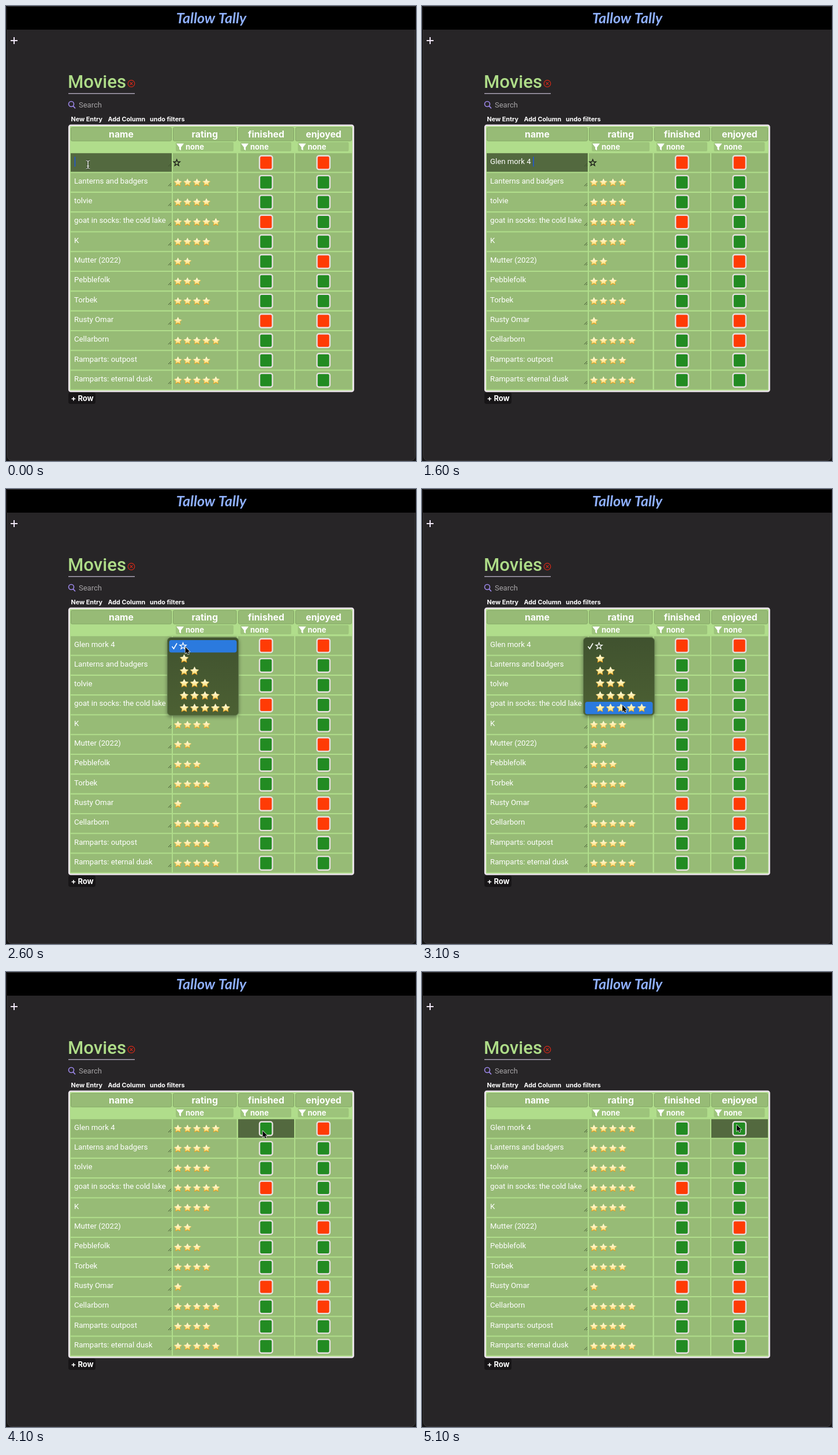
An HTML page with a canvas for the animation above (5.6 s loop, 710 px wide and 789 px high).

```html
<!DOCTYPE html>
<html lang="en">
<head>
<meta charset="utf-8">
<title>Movie list</title>
<style>
html, body { margin: 0; width: 100%; height: 100%; overflow: hidden; background: #151415; }
canvas { display: block; }
</style>
</head>
<body>
<canvas id="stage" width="710" height="789"></canvas>
<script>
const ctx = document.getElementById('stage').getContext('2d');
const LOOP = 5600;
const ROW_STEP = 34.3;
const BODY = 'Roboto, sans-serif';
const BOLD = 'Inter, sans-serif';
const CELL = '#97bb76', ACTIVE_ROW = '#93b772', FOCUS = '#53693f', LIGHT = '#b0dd8b';
const TYPED = 'Glen mork 4';

const COLUMNS = [
  { label: 'name', x: 112, w: 175 },
  { label: 'rating', x: 289, w: 110.5, filter: 294, fw: 100 },
  { label: 'finished', x: 402, w: 97, filter: 406, fw: 88 },
  { label: 'enjoyed', x: 501, w: 98, filter: 505.5, fw: 88 }
];

// title, stars, finished, enjoyed
const MOVIES = [
  ['Lanterns and badgers', 4, true, true],
  ['tolvie', 4, true, true],
  ['goat in socks: the cold lake', 5, false, true],
  ['K', 4, true, true],
  ['Mutter (2022)', 2, true, false],
  ['Pebblefolk', 3, true, true],
  ['Torbek', 4, true, true],
  ['Rusty Omar', 1, false, false],
  ['Cellarborn', 5, true, false],
  ['Ramparts: outpost', 4, true, true],
  ['Ramparts: eternal dusk', 5, true, true]
];

// Each step holds until the next one starts.
const STEPS = [
  { at: 0, chars: 0, focus: 0, caret: 1, beam: [142, 275] },
  { at: 100, chars: 2, focus: 0, caret: 1 },
  { at: 600, chars: 5, focus: 0, caret: 1 },
  { at: 1100, chars: 8, focus: 0, caret: 1 },
  { at: 1600, focus: 0, caret: 4 },
  { at: 2100, caret: 0.5, mouse: [300.5, 251.5] },
  { at: 2600, popup: 1, pick: 0, mouse: [310.5, 274] },
  { at: 3100, popup: 1, pick: 5, mouse: [347, 375] },
  { at: 3600, focus: 1, popup: 0.03, pick: 5, mouse: [407.5, 296.5] },
  { at: 4100, focus: 2, stars: 5, finished: true, mouse: [444.5, 275.5] },
  { at: 4600, focus: 2, stars: 5, finished: true, mouse: [519, 271] },
  { at: 5100, focus: 3, stars: 5, finished: true, enjoyed: true, mouse: [545, 265] }
];

function rect(x, y, w, h, fill, radius = 0, stroke, line = 1) {
  ctx.beginPath();
  ctx.roundRect(x, y, w, h, radius);
  if (fill) { ctx.fillStyle = fill; ctx.fill(); }
  if (stroke) { ctx.strokeStyle = stroke; ctx.lineWidth = line; ctx.stroke(); }
}

function text(str, x, y, font, color = '#fff', align = 'left') {
  ctx.font = font;
  ctx.fillStyle = color;
  ctx.textAlign = align;
  ctx.fillText(str, x, y);
}

function path(points, closed) {
  ctx.beginPath();
  points.forEach(([x, y]) => ctx.lineTo(x, y));
  if (closed) ctx.closePath();
}

function line(points, color, width) {
  path(points);
  ctx.strokeStyle = color;
  ctx.lineWidth = width;
  ctx.stroke();
}

function ring(x, y, r, color, width) {
  ctx.beginPath();
  ctx.arc(x, y, r, 0, Math.PI * 2);
  ctx.strokeStyle = color;
  ctx.lineWidth = width;
  ctx.stroke();
}

function starPath(x, y, r, inner) {
  path(Array.from({ length: 10 }, (_, i) => {
    const a = -Math.PI / 2 + i * Math.PI / 5, d = i % 2 ? r * inner : r;
    return [x + d * Math.cos(a), y + d * Math.sin(a)];
  }), true);
}

function hollowStar(x, y, color) {
  starPath(x, y, 6, 0.4);
  ctx.strokeStyle = color;
  ctx.lineWidth = 1.2;
  ctx.stroke();
}

function goldStars(count, x, y, step, r) {
  const rim = ctx.createLinearGradient(0, y - r, 0, y + r);
  rim.addColorStop(0.2, '#f8e07a');
  rim.addColorStop(0.85, '#e79a1c');
  const face = ctx.createLinearGradient(0, y - r, 0, y + r);
  face.addColorStop(0.2, '#fffbe0');
  face.addColorStop(0.9, '#fddc68');
  for (let i = 0; i < count; i++) {
    starPath(x + i * step, y + 0.7, r, 0.5);
    ctx.fillStyle = rim;
    ctx.fill();
    starPath(x + i * step, y, r - 1.2, 0.5);
    ctx.fillStyle = face;
    ctx.fill();
  }
}

function checkbox(x, y, on) {
  rect(x - 11.2, y - 11.7, 22.4, 23.6, on ? '#228b22' : '#ff3b05', 3.5, '#e6e0df', 2.4);
}

function funnel(x, y) {
  path([[x, y], [x + 13, y], [x + 8, y + 6.5], [x + 8, y + 12], [x + 5, y + 10], [x + 5, y + 6.5]], true);
  ctx.fillStyle = '#fff';
  ctx.fill();
}

function drawPage() {
  rect(0, 0, 710, 789, '#151415');
  rect(2.5, 0.5, 706, 788, '#272527', [0, 0, 8, 8], '#3b393b');
  rect(2, 1, 707, 40, '#000');
  text('Tallow Tally', 355.5, 29.5, 'italic bold 25px Lato, sans-serif', '#8fb0ff', 'center');

  line([[8, 60], [20, 60]], '#efe6f6', 2);
  line([[14, 54], [14, 66]], '#efe6f6', 2);

  text('Movies', 107, 142, '500 31.2px ' + BODY, '#aedc88');
  line([[108, 151.7], [223, 151.7]], '#aaa3b5', 1.5);
  ring(217, 134.5, 5.8, '#d32a18', 1.2);
  line([[214.7, 132.2], [219.3, 136.8]], '#d32a18', 1.2);
  line([[219.3, 132.2], [214.7, 136.8]], '#d32a18', 1.2);

  ring(113, 170, 4.5, '#9d88ea', 1.6);
  line([[116, 173.2], [120, 177.5]], '#9d88ea', 1.8);
  text('Search', 126, 176, '13px ' + BODY, '#a6a4a6');

  const button = 'bold 10.8px ' + BOLD;
  text('New Entry', 112.5, 200, button);
  text('Add Column', 176.5, 200, button);
  text('undo filters', 249, 200, button);

  rect(109.3, 206.8, 492.2, 461.4, LIGHT, 3, '#ece5eb', 2.8);
  for (const col of COLUMNS) {
    rect(col.x + 0.5, 210.5, col.w - 1, 23.5, CELL, 2, '#84a667');
    text(col.label, col.x + col.w / 2, 228, 'bold 15.8px ' + BOLD, '#fff', 'center');
    if (!col.filter) continue;
    rect(col.filter, 236, col.fw, 16, '#9dc47b', 2);
    funnel(col.filter + 1, 238.5);
    text('none', col.filter + 17, 248.5, 'bold 13px ' + BOLD);
  }

  rect(108, 670, 47, 20, '#171517', 4);
  text('+ Row', 112.5, 685, 'bold 13px ' + BOLD);
}

function drawRow(index, [title, stars, finished, enjoyed], focus) {
  const dy = index * ROW_STEP, y = 271.5 + dy;
  const fill = focus === undefined ? CELL : ACTIVE_ROW;
  COLUMNS.forEach((col, i) => rect(col.x, 255.3 + dy, col.w, 32.2, i === focus ? FOCUS : fill));
  text(title, 118, 273.5 + dy, '13.2px ' + BODY);
  line([[281, 278 + dy], [286, 273 + dy]], '#3f5230', 1);
  line([[284, 278.3 + dy], [286.3, 276 + dy]], '#3f5230', 1);
  if (stars) goldStars(stars, 297.8, y, 16.4, 7.6);
  else hollowStar(295.7, y + 0.5, '#111');
  checkbox(450.2, y, finished);
  checkbox(549.7, y, enjoyed);
}

function drawPopup(alpha, pick) {
  ctx.save();
  ctx.globalAlpha = alpha;
  ctx.shadowColor = 'rgba(0,0,0,.45)';
  ctx.shadowBlur = 7;
  ctx.shadowOffsetY = 2;
  const shade = ctx.createLinearGradient(0, 257, 0, 393);
  shade.addColorStop(0, '#40522f');
  shade.addColorStop(1, '#4c6033');
  rect(279.5, 257.5, 123, 135, shade, 6);
  ctx.shadowColor = 'transparent';
  rect(279.5, 257.5, 123, 135, null, 6, '#607a4c');
  rect(282.5, 262 + pick * 21.4, 117, 21.5, '#2b7ade', 4);
  line([[287.5, 273], [290.5, 277], [296, 267.5]], '#fff', 1.6);
  hollowStar(306.5, 272.5, '#fff');
  for (let n = 1; n <= 5; n++) goldStars(n, 308.5, 272.5 + n * 21.4, 18, 8.2);
  ctx.restore();
}

function drawArrow([x, y]) {
  path([[0, 0], [0, 11.3], [2.6, 8.9], [4.4, 12.8], [6.3, 12], [4.6, 8.2], [8, 8.2]].map(([a, b]) => [x + a, y + b]), true);
  ctx.lineJoin = 'round';
  ctx.strokeStyle = '#e8eee2';
  ctx.lineWidth = 1.5;
  ctx.stroke();
  ctx.fillStyle = '#050505';
  ctx.fill();
  ctx.lineJoin = 'miter';
}

function drawBeam([x, y]) {
  for (const [color, width] of [['#26301f', 2.8], ['#e9eee5', 1.1]]) {
    for (const side of [-1, 1]) {
      const hook = [[3.5, -7], [1, -6.5], [0, -5], [0, 5], [1, 6.5], [3.5, 7]];
      line(hook.map(([a, b]) => [x + side * a, y + b]), color, width);
    }
    line([[x - 2, y + 2.5], [x + 2, y + 2.5]], color, width);
  }
}

function draw(time) {
  const step = STEPS.findLast(s => s.at <= time);
  const title = TYPED.slice(0, step.chars ?? TYPED.length);
  drawPage();
  drawRow(0, [title, step.stars, step.finished, step.enjoyed], step.focus);
  MOVIES.forEach((movie, i) => drawRow(i + 1, movie));
  if (step.caret) {
    ctx.font = '13.2px ' + BODY;
    rect(118 + ctx.measureText(title).width + step.caret - 0.5, 261.5, 1.8, 17, '#2459c9');
  }
  if (step.popup) drawPopup(step.popup, step.pick);
  if (step.beam) drawBeam(step.beam);
  if (step.mouse) drawArrow(step.mouse);
}

const start = performance.now();
function tick() {
  draw((performance.now() - start) % LOOP);
  requestAnimationFrame(tick);
}
tick();
</script>
</body>
</html>
```
